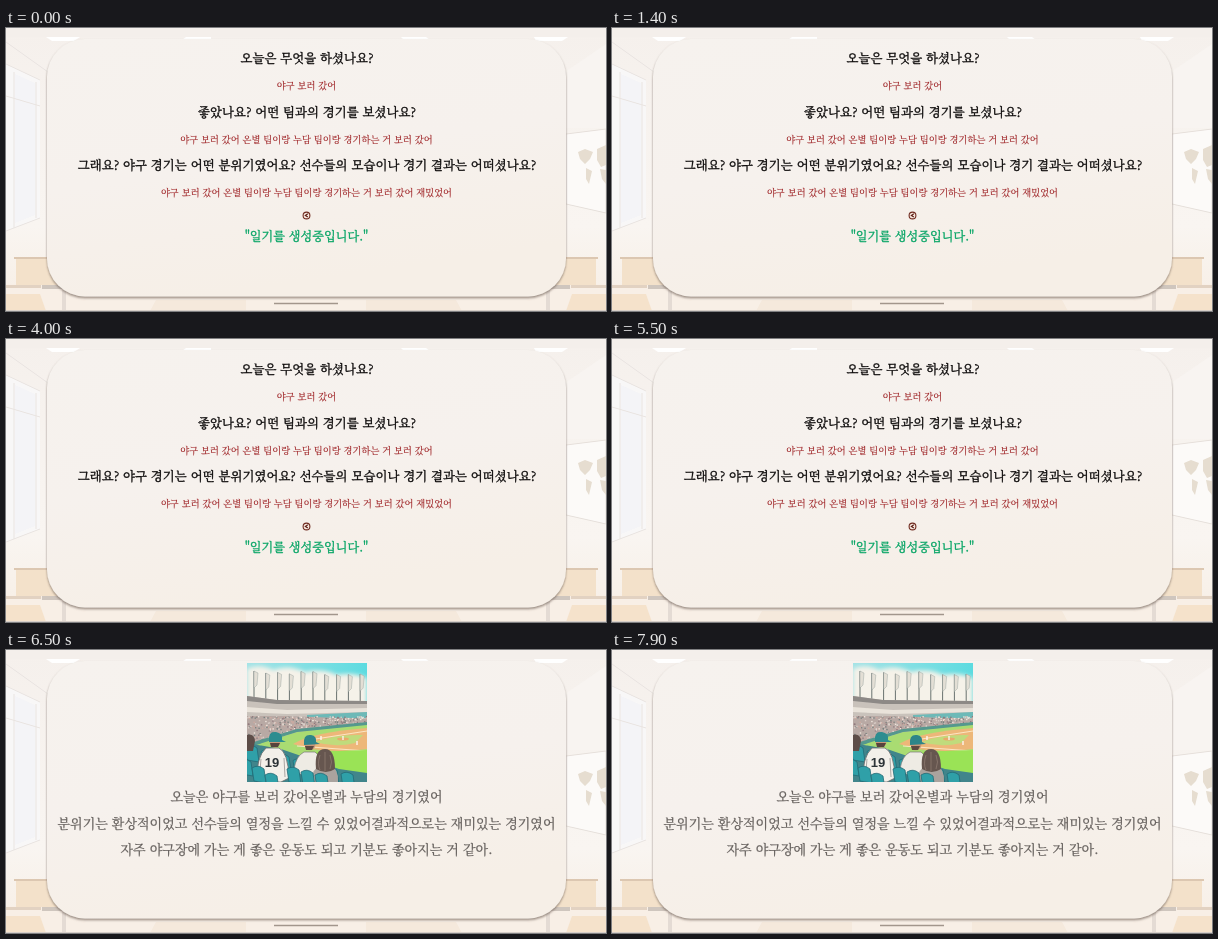
An HTML page that plays this animation: 600x283 px, repeating every 8000 ms.

```html
<!DOCTYPE html>
<html lang="ko">
<head>
<meta charset="utf-8">
<style>
html, body { margin: 0; height: 100%; overflow: hidden; background: #f7f1ec; }
svg { display: block; width: 100vw; height: 100vh; }
text { font-family: "Noto Serif CJK KR", "Noto Sans CJK KR", "Noto Sans CJK", serif; text-anchor: middle; }
.ask { font-size: 12.41px; fill: #0c0a0a; stroke: #0c0a0a; stroke-width: .35px; }
.reply { font-size: 9.28px; fill: #9c1d20; stroke: #9c1d20; stroke-width: .12px; }
.wait { font-size: 12.15px; fill: #08a566; stroke: #08a566; stroke-width: .35px; }
.diary { font-size: 13.04px; fill: #625d5a; stroke: #625d5a; stroke-width: .25px; }
.number { font: 700 13px "Liberation Sans", sans-serif; fill: #2c3337; }
</style>
</head>
<body>
<svg viewBox="0 0 600 283" preserveAspectRatio="none">
  <defs>
    <linearGradient id="wall" x2="0" y2="1">
      <stop stop-color="#f5f0ec"/><stop offset=".7" stop-color="#f9f5f1"/><stop offset="1" stop-color="#f7eee4"/>
    </linearGradient>
    <linearGradient id="card" x2=".3" y2="1">
      <stop stop-color="#f6f2ee"/><stop offset=".55" stop-color="#f6f1ed"/><stop offset="1" stop-color="#f6efe7"/>
    </linearGradient>
    <linearGradient id="sky">
      <stop stop-color="#a5e3e6"/><stop offset="1" stop-color="#5cdbe0"/>
    </linearGradient>
    <filter id="shade" x="-5%" y="-5%" width="110%" height="115%">
      <feDropShadow dx="0" dy="1.6" stdDeviation="1.2" flood-color="#75665c" flood-opacity=".75"/>
    </filter>
    <filter id="soft"><feGaussianBlur stdDeviation="2"/></filter>
    <clipPath id="crop"><rect width="120" height="119"/></clipPath>
  </defs>

  <!-- classroom -->
  <rect width="600" height="283" fill="url(#wall)"/>
  <path d="M0 0H600V9H0Z" fill="#f4efeb"/>
  <path d="M40 9H74L68 13H46ZM180 9H205V12H176ZM395 9H420L424 12H398ZM528 9H562L556 13H530Z" fill="#fff"/>
  <path d="M0 36L34 52V190L0 203Z" fill="#f8f7f7"/>
  <path d="M9 46L29 55V187L9 195Z" fill="#f4f4f7"/>
  <path d="M0 14L42 44M0 36L34 52M0 68L34 78M8 44V200M30 54V190M0 203L34 190" fill="none" stroke="#e9e4e1"/>
  <path d="M559 44L600 16V100H559Z" fill="#f8f4f1"/>
  <path d="M560 106L600 101V185L560 176Z" fill="#fcfaf8" stroke="#e6e0db"/>
  <path d="M572 124L579 121L587 124L584 131L579 136L574 131ZM580 140L586 143L583 156L580 151ZM591 121L600 117V137L595 139L591 132ZM594 141L600 142V156L596 151Z" fill="#e6ddd0"/>
  <path d="M0 256H600V283H0Z" fill="#f8efe6"/>
  <g id="desks">
    <path d="M10 230H58L64 236V257H10Z" fill="#f3e1ca"/>
    <path d="M8 229H60V231H8Z" fill="#dcc7b1"/>
    <path d="M0 257H35V260H0Z" fill="#e2d2c2"/>
    <path d="M36 257H70V261H36Z" fill="#cfc6be"/>
    <path d="M0 266H34L40 283H0Z" fill="#f5e2cb"/>
    <path d="M56 262H60V283H56Z" fill="#e4dbd4"/>
  </g>
  <use href="#desks" transform="matrix(-1 0 0 1 600 0)"/>
  <path d="M150 272H240V283H144ZM360 272H450L456 283H360Z" fill="#f5e9dc"/>
  <path d="M268 275.5H332" stroke="#a2968c" stroke-width="1.4"/>
  <path d="M0 282.5H600" stroke="#d6cec8"/>

  <rect x="41" y="11" width="519" height="257.5" rx="38" fill="url(#card)" filter="url(#shade)"/>

  <g id="chat">
    <text class="ask" x="301" y="35.3">오늘은 무엇을 하셨나요?</text>
    <text class="reply" x="300.5" y="61.3">야구 보러 갔어</text>
    <text class="ask" x="301" y="88.8">좋았나요? 어떤 팀과의 경기를 보셨나요?</text>
    <text class="reply" x="300.5" y="114.8">야구 보러 갔어 온별 팀이랑 누담 팀이랑 경기하는 거 보러 갔어</text>
    <text class="ask" x="301" y="142.3">그래요? 야구 경기는 어떤 분위기였어요? 선수들의 모습이나 경기 결과는 어떠셨나요?</text>
    <text class="reply" x="300.5" y="168.3">야구 보러 갔어 온별 팀이랑 누담 팀이랑 경기하는 거 보러 갔어 재밌었어</text>
    <circle cx="300.5" cy="187.5" r="3.4" fill="#f8e9df" stroke="#702b20" stroke-width="1.1"/>
    <path d="M301.8 185.8L299.4 187.4L301.8 189" fill="none" stroke="#5d2018" stroke-width="1.2"/>
    <text class="wait" x="300.5" y="213.3">"일기를 생성중입니다."</text>
  </g>

  <g id="diary">
    <g transform="translate(241 13)" clip-path="url(#crop)">
      <rect width="120" height="60" fill="url(#sky)"/>
      <path d="M0 6Q12 0 26 7Q42 1 58 9Q76 5 90 12Q106 9 120 15V48H0Z" fill="#f5f2e9" filter="url(#soft)"/>
      <g id="poles"></g>
      <path d="M0 33L30 37L120 38V72H0Z" fill="#c9c2bb"/>
      <path d="M0 33L30 37L120 38V41L30 41L0 38Z" fill="#8d8986"/>
      <path d="M0 44L40 47L120 45V49L40 51L0 49Z" fill="#e9e3da"/>
      <path d="M60 52L120 49V55L60 56Z" fill="#6db9b7"/>
      <path d="M0 53L40 53L120 56V62L50 69L0 84Z" fill="#b8a9a4"/>
      <g id="crowd"></g>
      <path d="M0 84L50 69L120 61V119H0Z" fill="#a9dc72"/>
      <path d="M0 81L50 66L120 59V62L50 69L0 85Z" fill="#55988e"/>
      <path d="M46 81Q66 69 120 65V86Q92 90 64 86Z" fill="#edb779"/>
      <path d="M68 79Q88 71 116 72L108 80Q88 85 68 79Z" fill="#c0db7c"/>
      <ellipse cx="96" cy="76" rx="6" ry="1.6" fill="#e9aa6b"/>
      <path d="M50 83L120 88M62 77L120 68" stroke="#fff1d6" stroke-width=".8"/>
      <path d="M74 73v4M96 73v4M110 78v4" stroke="#fff" stroke-width="1.2"/>
      <path d="M64 89L120 87V119H80Z" fill="#9ae356"/>
      <path d="M0 80L34 86L92 106L120 110V119H0Z" fill="#41858b"/>
      <g id="seats"></g>
      <!-- spectators -->
      <path d="M0 72Q7 70 8 78L6 88H0Z" fill="#5d4d48"/>
      <path d="M10 119Q9 94 19 85H32Q41 89 42 115L34 119Z" fill="#f3f0ea" stroke="#6c6a6b" stroke-width=".8"/>
      <path d="M14 96L12 119M37 95L38 114" stroke="#aaa5a2"/>
      <circle cx="28" cy="79" r="5.4" fill="#c99678"/>
      <path d="M22 78Q21 68 29 69Q36 70 35 77L39 79L22 79Z" fill="#2d8d90"/>
      <path d="M23 80H33L31 84H24Z" fill="#57433d"/>
      <text class="number" x="25" y="104">19</text>
      <path d="M47 106Q49 93 57 89H68Q75 93 74 108L62 118Z" fill="#eeebe4" stroke="#777" stroke-width=".7"/>
      <circle cx="63" cy="82" r="5.3" fill="#c79679"/>
      <path d="M57 81Q56 71 64 72Q70 73 69 79L73 81L57 82Z" fill="#2d8589"/>
      <path d="M58 83H67L65 87H59Z" fill="#5e4940"/>
      <path d="M64 119Q65 105 74 102H83Q92 106 91 119Z" fill="#aaa39e"/>
      <path d="M69 106Q67 86 78 86Q88 86 88 106Q79 112 69 106Z" fill="#66564f"/>
      <path d="M73 92Q70 101 73 107M78 89V108M83 92Q86 99 83 106" fill="none" stroke="#927f74" stroke-width=".7"/>
      <g id="front"></g>
    </g>
    <text class="diary" x="300.5" y="150.7">오늘은 야구를 보러 갔어온별과 누담의 경기였어</text>
    <text class="diary" x="300.5" y="177.7">분위기는 환상적이었고 선수들의 열정을 느낄 수 있었어결과적으로는 재미있는 경기였어</text>
    <text class="diary" x="300.5" y="204.2">자주 야구장에 가는 게 좋은 운동도 되고 기분도 좋아지는 거 같아.</text>
  </g>
</svg>
<script>
const $ = id => document.getElementById(id);
const LOOP = 8000, REVEAL = 6000;

let seed = 19;
const rand = () => (seed = seed * 16807 % 2147483647) / 2147483647;
const repeat = (n, draw) => Array.from({ length: n }, (_, i) => draw(i)).join('');
const seat = (x, y) =>
  `<path d="M${x} ${y}q6-4 12 1l2 14-12-2Z" fill="#2fa0a8" stroke="#226b76" stroke-width=".8"/>`;

$('poles').innerHTML = repeat(10, i => {
  const x = 7 + i * 11.8, y = 8 + rand() * 4;
  return `<path d="M${x} ${y}V38" stroke="#69726f" stroke-width="1"/>
    <path d="M${x} ${y}l4 2-1 12-3 3Z" fill="#e3dfd5" stroke="#8f9a98" stroke-width=".4"/>`;
});

const tones = ['#f1e8df', '#8f797d', '#d0aaa0', '#77807f', '#d9cdc7'];
$('crowd').innerHTML = repeat(330, i => {
  const x = rand() * 120, y = 53 + rand() * (10 + Math.max(0, 60 - x) * .3);
  return `<rect x="${x}" y="${y}" width="1.4" height="1.3" fill="${tones[i % 5]}"/>`;
});

$('seats').innerHTML = repeat(7, i => seat(i * 16 - 2, 84 + i * 4.5));
$('front').innerHTML = repeat(3, i => seat(i * 13 - 8, 98 + i * 7)) + repeat(3, i => seat(40 + i * 14, 106 + i * 3));

function frame(now) {
  const done = now % LOOP >= REVEAL;
  $('chat').style.display = done ? 'none' : '';
  $('diary').style.display = done ? '' : 'none';
  requestAnimationFrame(frame);
}
frame(performance.now());
</script>
</body>
</html>
```
